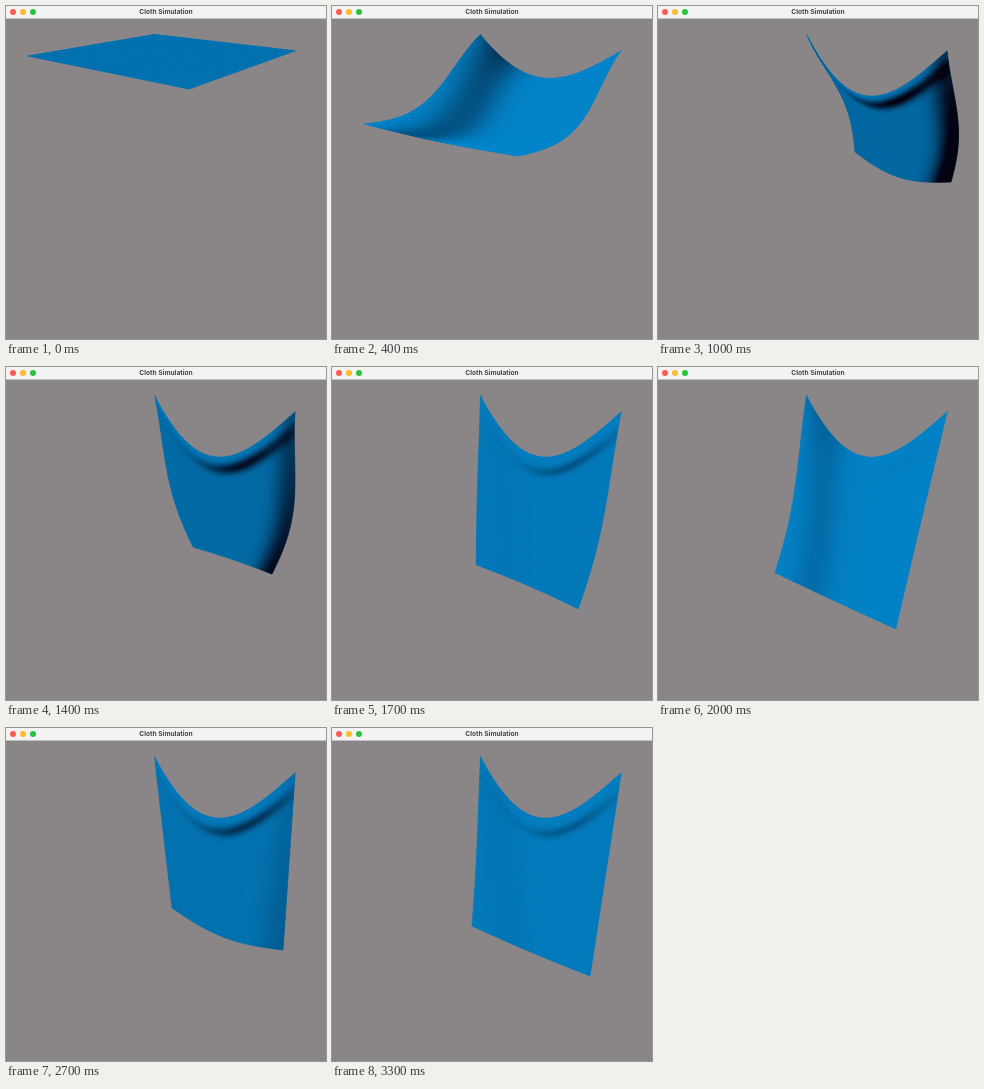
An HTML page with a canvas that plays this animation: 320 by 333 pixels, repeating every 3400 ms.

```html
<!DOCTYPE html>
<html lang="en">
<head>
<meta charset="utf-8">
<title>Cloth Simulation</title>
<style>
  html, body { margin: 0; width: 100%; height: 100%; overflow: hidden; background: #8a8688; }
  canvas { position: absolute; left: 0; top: 0; }
  header {
    position: absolute; left: 0; top: 0; width: 320px; height: 12px;
    background: #f4f3f3; border-bottom: 1px solid #c2c0c1; color: #434343;
    text-align: center; font: 700 6.65px/12.4px Inter, Roboto, sans-serif;
  }
  i { position: absolute; top: 2.8px; width: 6.4px; height: 6.4px; border-radius: 50%; }
</style>
</head>
<body>
<canvas id="stage" width="320" height="333"></canvas>
<header>
  <i style="left:4px;background:#fd5b54"></i>
  <i style="left:14px;background:#fcba2c"></i>
  <i style="left:24px;background:#27c43c"></i>
  Cloth Simulation
</header>
<script>
const ctx = document.getElementById('stage').getContext('2d');
const LOOP = 3400, STEP = 100, N = 60;
const A = [148.6, 28.5], B = [289.2, 44.8];   // pinned corners
const SAG = 54, REST_X = 148, REACH = 50;

// Free corners on their swing: time, left x y, right x y,
// then the bulge of the left, right and bottom edges
const swings = [
  [100, 22, 50, 183, 83, 0, 0, 0],
  [400, 32, 118, 186, 150, 20, 22, -2],
  [600, 80, 217, 210, 286, 16, -5, -2],
  [800, 168, 195, 277, 238, 2, 3, -4],
  [1000, 197, 146, 293, 176, 9, 9, -11],
  [1400, 187, 180, 266, 207, -7, 12, 1],
  [1950, 117, 206, 237, 262, 5, 0, 0],
  [2700, 166, 180, 277, 222, 0, 0, -9],
  [3300, 140, 198, 258, 248, 1, 0, -1]
];

const clamp = x => Math.max(0, Math.min(1, x));
const bump = (x, center, width) => Math.exp(-(((x - center) / width) ** 2));

function hermite(a, b, m, n, s) {
  const r = 1 - s;
  return a * r * r * (1 + 2 * s) + b * s * s * (3 - 2 * s) + m * s * r * r - n * s * s * r;
}

function poseAt(time) {
  const t = Math.max(time, swings[0][0]);
  let i = 0;
  while (i < swings.length - 2 && t >= swings[i + 1][0]) i++;
  const a = swings[i], b = swings[i + 1], before = swings[i - 1], after = swings[i + 2];
  const span = b[0] - a[0], s = (t - a[0]) / span;
  const slope = (p, q, k) => p && q ? .75 * span * (q[k] - p[k]) / (q[0] - p[0]) : 0;
  const [, lx, ly, rx, ry, leftBulge, rightBulge, hem] =
    a.map((value, k) => hermite(value, b[k], slope(before, b, k), slope(a, after, k), s));
  return {
    l: [lx, ly], r: [rx, ry], leftBulge, rightBulge, hem,
    slack: clamp((t - 100) / 450),          // 0 while flat, 1 when hanging
    swing: (lx - REST_X) / REACH            // negative in front, positive behind
  };
}

// Point on the chord p-q, pushed sideways by a sine bulge
function edge(p, q, bulge, skew, s) {
  const dx = q[0] - p[0], dy = q[1] - p[1];
  const push = bulge * Math.sin(Math.PI * s ** skew) / Math.hypot(dx, dy);
  return [p[0] + dx * s + dy * push, p[1] + dy * s - dx * push];
}

function surface(pose, u, v) {
  const { l, r } = pose;
  const top = edge(A, B, -SAG * pose.slack, .93, u);
  const bottom = edge(l, r, pose.hem, 1, u);
  const left = edge(A, l, pose.leftBulge, 1.4, v);
  const right = edge(B, r, pose.rightBulge, 1.4, v);
  return [0, 1].map(k =>
    (1 - v) * (top[k] - (1 - u) * A[k] - u * B[k]) +
    v * (bottom[k] - (1 - u) * l[k] - u * r[k]) +
    (1 - u) * left[k] + u * right[k]);
}

// Facing light, less the roll under the top edge, the turned right side and the left crease
function lightAt({ swing, slack }, u, v) {
  const back = Math.max(0, swing), front = Math.max(0, -swing);
  const rim = slack * clamp(.3 + .45 * swing);
  const roll = rim * bump(u, .68, .3) * bump(v, .12, .03 + .05 * rim * rim);
  const lip = .12 * rim * bump(v, .02, .05);
  const side = 1.1 * back * back * bump(u, .98, .09 + .07 * v) * (.4 + .6 * v);
  const crease = .22 * front * slack * bump(u, .14 + .16 * v, .16) * (1 + .6 * Math.exp(-8 * v));
  return clamp(.76 + slack * (.04 - .11 * Math.max(swing, -1.4)) - roll + lip - side - crease);
}

function draw(time) {
  const pose = poseAt(time), grid = [];
  for (let j = 0; j <= N; j++)
    for (let i = 0; i <= N; i++) grid.push(surface(pose, i / N, j / N));

  ctx.clearRect(0, 0, 320, 333);
  ctx.lineWidth = .7;
  ctx.lineJoin = 'round';
  for (let j = 0; j < N; j++) {
    for (let i = 0; i < N; i++) {
      const n = j * (N + 1) + i;
      const light = lightAt(pose, (i + .5) / N, (j + .5) / N);
      ctx.fillStyle = ctx.strokeStyle = `rgb(0,${2 + 147 * light},${18 + 208 * light})`;
      ctx.beginPath();
      for (const corner of [n, n + 1, n + N + 2, n + N + 1]) ctx.lineTo(...grid[corner]);
      ctx.closePath();
      ctx.fill();
      ctx.stroke();
    }
  }
}

const start = performance.now();
let shown = -1;
function tick() {
  const elapsed = (performance.now() - start) % LOOP;
  const time = Math.floor(elapsed / STEP) * STEP;
  if (time !== shown) draw(shown = time);
  requestAnimationFrame(tick);
}
tick();
</script>
</body>
</html>
```
